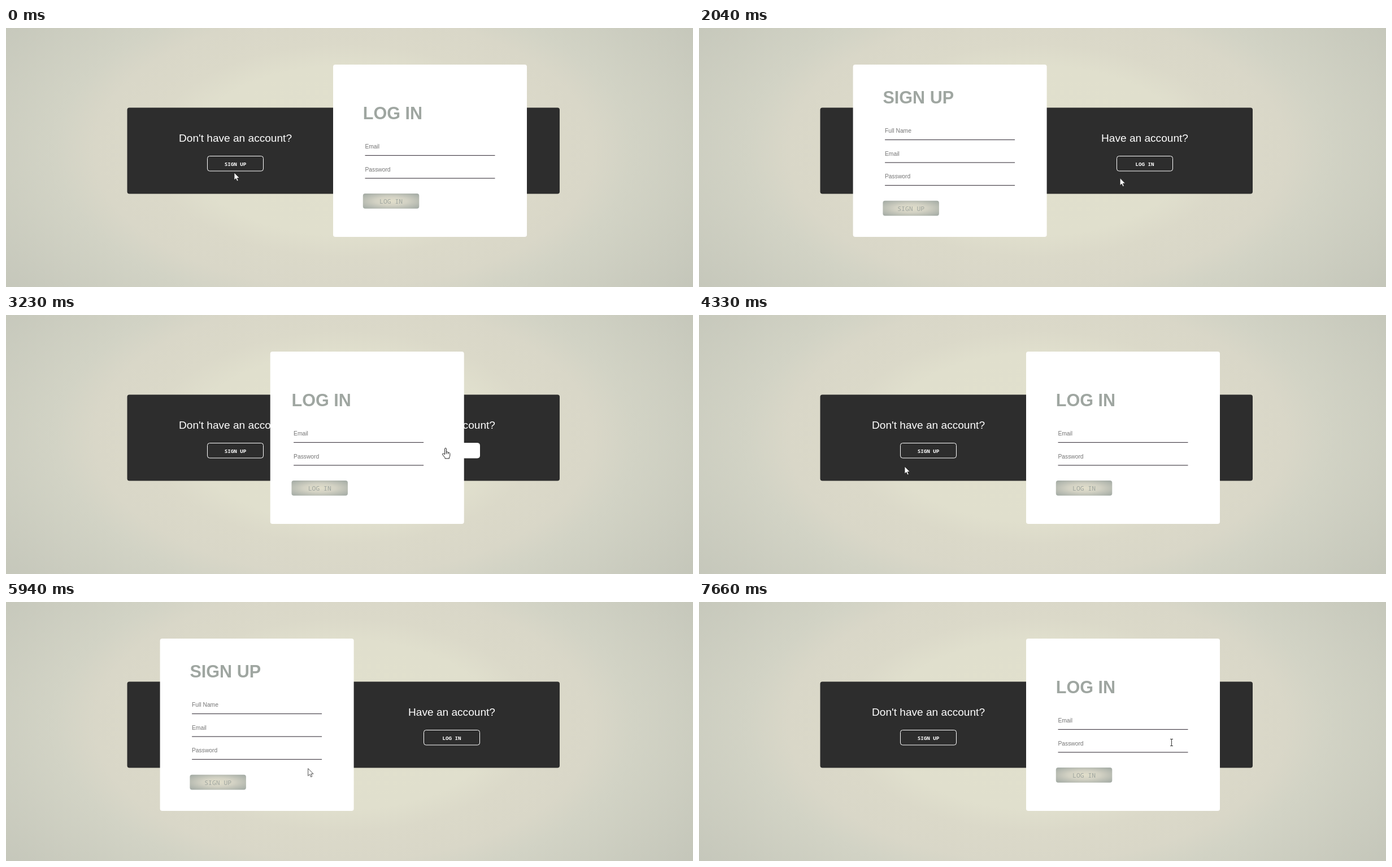
An HTML page that plays this animation: 1216 by 460 pixels, repeating every 8.67 s.

```html
<!DOCTYPE html>
<html lang="en">
<head>
<meta charset="utf-8">
<title>Sliding login card</title>
<style>
  html, body { margin: 0; width: 100%; height: 100%; overflow: hidden; background: #d2d3c5; }
  svg { display: block; width: 100%; height: 100%; }
  text { font-family: "Liberation Sans", Arial, sans-serif; white-space: pre; }
  .title { font-size: 30.6px; font-weight: 700; fill: #9fa6a1; }
  .field { font-size: 10.3px; fill: #757575; }
  .question { font-size: 19.1px; fill: #fff; text-anchor: middle; }
  .label { font-family: "Noto Sans Mono", "DejaVu Sans Mono", monospace; text-anchor: middle; }
  .submit { font-size: 11.4px; fill: #9fa59f; }
  .switch { font-size: 9.2px; font-weight: 600; }
  .cursor { fill: #fff; stroke: #222; stroke-linejoin: round; }
</style>
</head>
<body>
<svg viewBox="0 0 1216 460">
  <defs>
    <radialGradient id="page" gradientUnits="userSpaceOnUse" cx="0" cy="0" r="800"
      gradientTransform="translate(598 218) scale(1 .552)">
      <stop offset="0" stop-color="#e1e0cd"/>
      <stop offset=".34" stop-color="#e0dfcd"/>
      <stop offset=".43" stop-color="#dbd9c9"/>
      <stop offset=".55" stop-color="#d9d7c8"/>
      <stop offset=".64" stop-color="#d2d3c5"/>
      <stop offset="1" stop-color="#c2c4b8"/>
    </radialGradient>
    <radialGradient id="button" r=".707">
      <stop offset="0" stop-color="#e2dfcb"/>
      <stop offset=".4" stop-color="#d3d2c4"/>
      <stop offset="1" stop-color="#a0a8a2"/>
    </radialGradient>
  </defs>
  <rect width="1216" height="460" fill="url(#page)"/>
  <rect x="214.5" y="141.5" width="765.5" height="153" rx="4" fill="#2d2d2d"/>
  <g id="panel"></g>
  <g id="card">
    <rect y="65" width="343" height="306" rx="4" fill="#fff"/>
    <g id="login"></g>
    <g id="signup"></g>
  </g>
  <g id="pointer">
    <path id="arrow" class="cursor" stroke-width=".8" d="M0 0V13L3 10.3 5 15 7.2 14 5.2 9.5H9.3Z"/>
    <g id="hand" class="cursor">
      <path d="M-1.4 11V1.2a1.4 1.4 0 0 1 2.8 0V6.5L3.6 6.8Q4.3 6.9 4.6 7.6L6.2 7.9Q7.8 8.3 7.8 10V13Q7.8 15 6.5 16.5V18.4H-1V17L-5.2 11.6Q-6 10 -4.6 9.4Q-3.2 9.2 -1.4 11.3Z"/>
      <path fill="none" d="M1.4 6.5v4M4.5 7.5v3"/>
    </g>
    <path id="beam" fill="none" stroke="#333" d="M-.5 -5H4.5M2 -5V7M-.5 7H4.5"/>
    <circle id="ring" r="9.5" fill="#ff0" opacity=".6"/>
  </g>
</svg>
<script>
const LOOP = 8670, STEP = 78.2, PHASE = 22;   // the picture advances in even steps
const PRESS = 160, DELAY = 111, SLIDE = 620, FADE = 400;
const CARD_X = [579, 272.6], FORM_SHIFT = 41.5;   // log in, sign up
const SWITCH_X = [406, 789];

// Every click sends the card to the other side
const clicks = [645, 2750, 4640, 6820];
// Pointer strokes; dip is how far the arc sags
const strokes = [
  { start: 0, end: 350, x: 399.5, y: 242, dip: 0 },
  { start: 1512, end: 2080, x: 778, y: 236.5, dip: 110 },
  { start: 3633, end: 4323, x: 364, y: 269, dip: 58 },
  { start: 4323, end: 4483, x: 367.5, y: 249, dip: 0 },
  { start: 5573, end: 6350, x: 834.5, y: 248.5, dip: 52 }
];

const $ = id => document.getElementById(id);
const show = (id, on) => { $(id).style.display = on ? "" : "none"; };
const mix = (a, b, p) => a + (b - a) * p;
const smooth = v => { const p = Math.min(1, Math.max(0, v)); return p * p * (3 - 2 * p); };

function form(title, titleY, fields, firstLine, buttonY) {
  const rows = fields.map((name, i) => {
    const y = firstLine + i * 40.5;
    return `<text class="field" x="56.4" y="${y - 12.4}">${name}</text>
      <rect x="56.5" y="${y - .6}" width="230" height="1.2" fill="#4a444c"/>`;
  }).join("");
  return `<text class="title" x="52.8" y="${titleY}">${title}</text>${rows}
    <rect x="52.8" y="${buttonY}" width="99.5" height="26.8" rx="4" fill="url(#button)"/>
    <text class="label submit" x="102.6" y="${buttonY + 18}">${title}</text>`;
}

function message(question, label, x) {
  return `<text class="question" x="${x}" y="202">${question}</text>
    <rect class="box" x="${x - 49.5}" y="227.5" width="99" height="26.5" rx="4" fill="#fff" stroke="#fff"/>
    <text class="label switch" x="${x}" y="245">${label}</text>`;
}

$("login").innerHTML = form("LOG IN", 161.8, ["Email", "Password"], 226.4, 294);
$("signup").innerHTML = form("SIGN UP", 134.4, ["Full Name", "Email", "Password"], 198.5, 306.7);
$("panel").innerHTML = message("Don't have an account?", "SIGN UP", SWITCH_X[0])
  + message("Have an account?", "LOG IN", SWITCH_X[1]);
const boxes = document.querySelectorAll(".box");
const labels = document.querySelectorAll(".switch");

// side: 0 log in, 1 sign up; active: the switch button that can be hovered
function cardAt(t) {
  const i = clicks.findLastIndex(click => t >= click + DELAY);
  const side = (i + 1) % 2;
  const p = i < 0 ? 1 : smooth((t - clicks[i] - DELAY) / SLIDE);
  return { side, p, active: p < 1 ? 1 - side : side };
}

function pointerAt(t) {
  let x = 404, y = 257;
  for (const s of strokes.filter(s => t >= s.start)) {
    const p = smooth((t - s.start) / (s.end - s.start));
    x = mix(x, s.x, p);
    y = mix(y, s.y, p) + s.dip * Math.sin(Math.PI * p);
  }
  return { x, y };
}

function hovers(button, t) {
  const { x, y } = pointerAt(t);
  return cardAt(t).active === button
    && Math.abs(x - SWITCH_X[button]) < 50 && Math.abs(y - 241) < 13.5;
}

// Share of the last FADE ms that the pointer spent on the button
function glowAt(button, t) {
  const samples = 20;
  let count = 0;
  for (let k = 0; k < samples; k++) count += hovers(button, t - k * FADE / samples);
  return smooth(count / samples);
}

function cursorAt(t) {
  const { x, y } = pointerAt(t), { side, p } = cardAt(t);
  if (hovers(0, t) || hovers(1, t)) return "hand";
  const onField = x > 635 && x < 865 && y > 196 && y < 267;
  return side === 0 && p === 1 && onField ? "beam" : "arrow";
}

function draw(time) {
  const t = Math.max(0, Math.floor((time - PHASE) / STEP) * STEP + PHASE);
  const { side, p } = cardAt(t);
  const shift = (side ? 1 : -1) * FORM_SHIFT * (1 - p);
  $("card").setAttribute("transform", `translate(${mix(CARD_X[1 - side], CARD_X[side], p)} 0)`);
  ["login", "signup"].forEach((id, i) => {
    show(id, i === side);
    $(id).setAttribute("transform", `translate(${shift} 0)`);
  });

  boxes.forEach((box, i) => {
    const glow = glowAt(i, t);
    box.setAttribute("fill-opacity", glow);
    labels[i].setAttribute("fill", `rgb(${[159, 165, 159].map(c => mix(255, c, glow))})`);
  });

  const { x, y } = pointerAt(t), cursor = cursorAt(t);
  $("pointer").setAttribute("transform", `translate(${x} ${y})`);
  for (const id of ["arrow", "hand", "beam"]) show(id, id === cursor);
  show("ring", clicks.some(click => t >= click && t < click + PRESS));
}

const origin = performance.now();
function tick() {
  draw((performance.now() - origin) % LOOP);
  requestAnimationFrame(tick);
}
tick();
</script>
</body>
</html>
```
